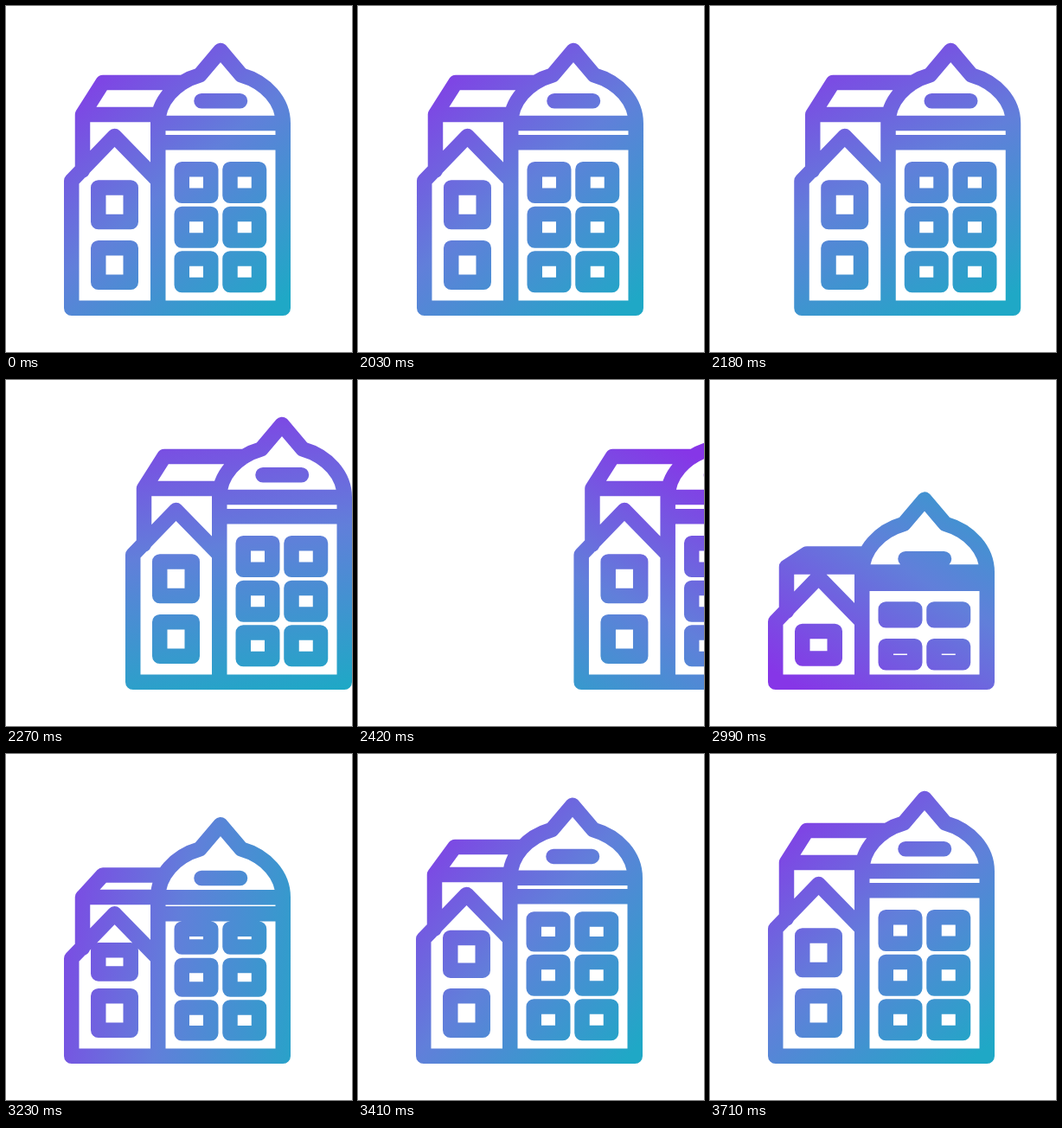
Recreate the animation shown at these times as an HTML page. Size 400 px wide and 400 px high, loop 3.74 s.

```html
<!DOCTYPE html>
<html lang="en">
<head>
<meta charset="utf-8">
<title>Town houses</title>
<style>
  html, body { margin: 0; width: 100%; height: 100%; overflow: hidden; background: #fff; }
  svg { display: block; width: 100%; height: 100%; }
  path { fill: none; stroke: url(#tint); stroke-width: 17.5; stroke-linecap: round; stroke-linejoin: round; }
</style>
</head>
<body>
<svg viewBox="0 0 400 400">
  <defs>
    <linearGradient id="tint" gradientUnits="userSpaceOnUse" x1="15" y1="200" x2="385" y2="200">
      <stop offset="0" stop-color="#8636e7"/>
      <stop offset=".5" stop-color="#617fda"/>
      <stop offset="1" stop-color="#1fa8c6"/>
    </linearGradient>
  </defs>
  <path id="icon"/>
</svg>
<script>
const LOOP = 3740, HOLD = 2030, STEP = 30;
const SLIDE = 1990, GROW = 2560, SETTLED = 3620;
const BASE = 349.25, LEFT = 75.75, WALL = 175.75, RIGHT = 320.25, MID = 248;

const icon = document.getElementById('icon');
const tint = document.getElementById('tint');
const clamp = (v, lo = 0, hi = 1) => Math.min(hi, Math.max(lo, v));
const smooth = u => u * u * (3 - 2 * u);
const easeOut = u => 1 - (1 - u) ** 2;

// x centre, y centre, half width, half height, distance to the growth line, start time
const panes = [
  [125.5, 299.5, 18.75, 19.75, 34, 2697],
  [125.5, 229.75, 18.75, 19.75, 34, 2995]
];
[[307.25, 2783], [255.75, 2863], [204, 3000]].forEach(([y, start]) => {
  for (const x of [220, 275.75]) panes.push([x, y, 16.75, 15.25, 27, start]);
});

function pane([x, y, w, h, drop, start], t) {
  const s = t < GROW ? 1 : easeOut(clamp((t - start) / 530));
  if (!s) return '';
  const cy = y + drop * (1 - s);
  return `M${x - w} ${cy - h * s}h${2 * w}v${2 * h * s}h${-2 * w}z`;
}

function building(t) {
  // 0 at rest, above 1 while still low
  const g = t < GROW ? 0 : Math.max(0, (SETTLED - t) / 930);

  // Tower
  const fall = 204 * g ** 2.2;
  const sink = Math.min(213.75, fall + 8 * clamp((fall - 150) / 54));
  const rise = 1 - sink / 213.75;
  const scaled = y => BASE - (BASE - y) * rise;
  const band = 135.5 + sink;
  const tip = Math.min(BASE, 51.5 + fall);
  const squash = (band - tip) / 84;
  const ry = 59 * squash;
  const neck = band - 55.7 * squash;
  const arc = `A72.25 ${Math.max(ry, .01)} 0 0 1 `;
  const domeEdge = y => MID - 72.25 * Math.sqrt(1 - clamp((band - y) / Math.max(ry, .01)) ** 2);

  let d = `M${WALL} ${BASE}V${band}${arc}224 ${neck}L${MID} ${tip}L272 ${neck}` +
    `${arc}${RIGHT} ${band}V${BASE}H${LEFT}` +
    `M${WALL} ${band}H${RIGHT}M${WALL} ${scaled(157.75)}H${RIGHT}` +
    `M226 ${scaled(109.75)}H270.5`;

  // Front house
  const drop = 150 * g ** 1.7;
  const eave = Math.min(BASE, 202 + drop);
  const peak = Math.min(BASE, 150.5 + drop);
  d += `M${LEFT} ${BASE}V${eave}L125.5 ${peak}L${WALL} ${eave}`;

  // House behind
  const ledge = Math.min(BASE, 125.5 + drop * 1.17);
  const ridge = ledge - 37 * Math.max(0, 1 - g ** 1.35);
  const foot = Math.min(BASE, 190 + drop);
  d += `M88.5 ${foot}V${ledge}H${domeEdge(ledge)}` +
    `M88.5 ${ledge}L112 ${ridge}H${domeEdge(ridge)}`;

  return d + panes.map(p => pane(p, t)).join('');
}

function draw(now) {
  const time = now % LOOP;
  const t = time < HOLD ? 0 : HOLD + Math.floor((time - HOLD) / STEP) * STEP;
  const shift = t < HOLD || t > GROW ? 0 : 71 * ((t - SLIDE) / 280) ** 2.2;
  const angle = 50 + 360 * smooth(clamp((t - SLIDE) / 1560));
  icon.setAttribute('d', building(t));
  icon.setAttribute('transform', `translate(${shift})`);
  // The tint turns about the stage centre, so undo the icon's shift
  tint.setAttribute('gradientTransform', `translate(${-shift}) rotate(${angle} 200 200)`);
}

const began = performance.now();
function tick() {
  draw(performance.now() - began);
  requestAnimationFrame(tick);
}
tick();
</script>
</body>
</html>
```
